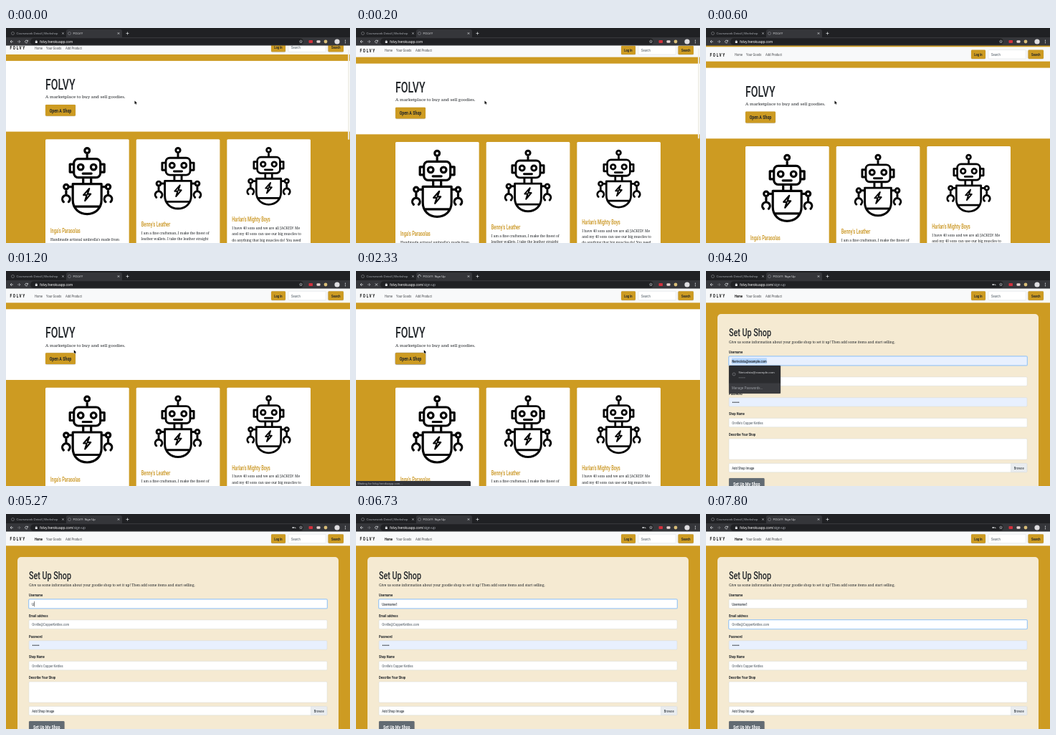
Animation of 480 by 300 pixels, one loop 8 s. Source, as an HTML page with a canvas:

```html
<!DOCTYPE html>
<html lang="en">
<head>
<meta charset="utf-8">
<title>Shop sign up</title>
<style>
html, body { margin: 0; width: 100%; height: 100%; overflow: hidden; background: #202124; }
canvas { display: block; width: 480px; height: 300px; }
</style>
</head>
<body>
<canvas id="stage"></canvas>
<script>
const W = 480, H = 300, LOOP = 8000;
const GOLD = '#cd9b22', INK = '#212529', GREY = '#6c757d', LINE = '#ced4da', FILLED = '#e8f0fe';
const SANS = '"Liberation Sans", Arial, sans-serif';
const DISPLAY = 'Roboto, "Liberation Sans", sans-serif';
const SERIF = '"Noto Serif", serif';
const NARROW = 0.7; // condensed look of the display face
const SHOP = 'FOLVY', HOST = 'folvy.herokuapp.com', MAIL = 'Nerivolsta@example.com';

const canvas = document.getElementById('stage');
const c = canvas.getContext('2d');
const dpr = window.devicePixelRatio || 1;
canvas.width = W * dpr;
canvas.height = H * dpr;

// ---------- helpers ----------
function track(t, keys) {
  if (t <= keys[0][0]) return keys[0][1];
  for (let i = 1; i < keys.length; i++) {
    const [t0, v0] = keys[i - 1], [t1, v1] = keys[i];
    if (t < t1) {
      const k = (t - t0) / (t1 - t0);
      return v0 + (v1 - v0) * k * k * (3 - 2 * k);
    }
  }
  return keys[keys.length - 1][1];
}

function rect(x, y, w, h, fill) {
  c.fillStyle = fill;
  c.fillRect(x, y, w, h);
}

function box(x, y, w, h, r, fill, stroke, line = 0.4) {
  c.beginPath();
  c.roundRect(x, y, w, h, r);
  if (fill) { c.fillStyle = fill; c.fill(); }
  if (stroke) { c.strokeStyle = stroke; c.lineWidth = line; c.stroke(); }
}

function disc(x, y, r, fill) {
  c.beginPath();
  c.arc(x, y, r, 0, 7);
  c.fillStyle = fill;
  c.fill();
}

function path(points, color, width) {
  c.beginPath();
  points.forEach(([x, y], i) => i ? c.lineTo(x, y) : c.moveTo(x, y));
  c.strokeStyle = color;
  c.lineWidth = width;
  c.stroke();
}

function text(s, x, y, size, color, face = SANS) {
  c.font = size + 'px ' + face;
  c.textAlign = 'left';
  c.fillStyle = color;
  c.fillText(s, x, y);
}

function display(s, x, y, size, color, align = 'left', weight = 500, gap = 0) {
  c.save();
  c.translate(x, y);
  c.scale(NARROW, 1);
  c.letterSpacing = gap + 'px';
  c.font = weight + ' ' + size + 'px ' + DISPLAY;
  c.textAlign = align;
  c.fillStyle = color;
  c.fillText(s, 0, 0);
  const width = c.measureText(s).width * NARROW;
  c.restore();
  return width;
}

function button(label, x, y, w, h, size, fill = GOLD, color = INK) {
  c.save();
  c.shadowColor = 'rgba(0,0,0,.3)';
  c.shadowBlur = 1.2 * dpr;
  c.shadowOffsetY = 0.3 * dpr;
  box(x, y, w, h, 1.4, fill);
  c.restore();
  display(label, x + w / 2, y + h / 2 + size * 0.36, size, color, 'center', 700);
}

// ---------- browser frame ----------
function globe(x, y) {
  c.beginPath();
  c.arc(x, y, 2, 0, 7);
  c.strokeStyle = '#8b8e93';
  c.lineWidth = 0.6;
  c.stroke();
}

function cross(x, y, r, color) {
  path([[x - r, y - r], [x + r, y + r]], color, 0.7);
  path([[x + r, y - r], [x - r, y + r]], color, 0.7);
}

function chrome(t, loading, signUp) {
  const light = '#e3e5e8', dim = '#a9adb3';
  rect(0, 0, W, 14, '#202124');
  box(84, 2, 78, 14, 2.5, '#35363a');
  rect(0, 13, W, 11.5, '#35363a');
  globe(9.5, 7.5);
  text('Coursework Detail | Workshop', 14.5, 9, 4.3, dim);
  cross(79.5, 7.5, 1.1, light);
  if (loading) {
    const a = t / 160;
    c.beginPath();
    c.arc(88.5, 7.5, 2, a, a + 4.4);
    c.strokeStyle = light;
    c.lineWidth = 0.7;
    c.stroke();
  } else globe(88.5, 7.5);
  text(loading || signUp ? SHOP + ': Sign Up' : SHOP, 93.5, 9, 4.3, light);
  cross(157, 7.5, 1.2, light);
  path([[167.5, 7.5], [171.5, 7.5]], light, 0.7);
  path([[169.5, 5.5], [169.5, 9.5]], light, 0.7);

  const arrow = (x, d, color) => {
    path([[x - 2 * d, 19], [x + 2 * d, 19]], color, 0.7);
    path([[x, 17], [x + 2 * d, 19], [x, 21]], color, 0.7);
  };
  arrow(8, -1, light);
  arrow(18, 1, signUp ? '#77797d' : dim);
  if (loading) cross(28.5, 19, 1.7, light);
  else {
    c.beginPath();
    c.arc(28.5, 19, 1.9, 0.5, 5.6);
    c.strokeStyle = light;
    c.lineWidth = 0.7;
    c.stroke();
    path([[30.5, 16.8], [30.5, 18.6], [28.8, 18.6]], light, 0.7);
  }
  box(34, 14.3, 381, 9.2, 4.6, '#202124');
  box(40.8, 18.3, 3, 2.6, 0.3, light);
  c.beginPath();
  c.arc(42.3, 18.2, 0.9, Math.PI, 0);
  c.strokeStyle = light;
  c.lineWidth = 0.5;
  c.stroke();
  text(HOST, 47.3, 20.7, 5, '#fff');
  if (loading || signUp) text('/sign-up', 47.3 + c.measureText(HOST).width, 20.7, 5, dim);
  if (signUp) {
    disc(400.5, 19, 1.1, light);
    path([[401, 19], [404, 19], [404, 20.2]], light, 0.7);
  }
  c.beginPath();
  for (let i = 0; i < 10; i++) {
    const r = i % 2 ? 1 : 2.2, a = i * Math.PI / 5 - Math.PI / 2;
    c.lineTo(411.5 + r * Math.cos(a), 19 + r * Math.sin(a));
  }
  c.closePath();
  c.strokeStyle = light;
  c.lineWidth = 0.5;
  c.stroke();
  box(422.5, 17, 5.5, 4, 0.8, '#d2303c');
  box(433.5, 17.3, 5, 3.4, 1, '#e6d5d3');
  disc(446, 19, 2.4, '#d8bd78');
  disc(462, 19, 3.6, '#dedde0');
  for (let i = -1; i < 2; i++) disc(473.5, 19 + i * 1.8, 0.6, light);
}

// ---------- pages ----------
function navbar(signUp) {
  rect(0, 24, W, 20.3, '#f8f9fa');
  display(SHOP, 5.5, 37.4, 6.8, '#111', 'left', 600, 2.4);
  const soft = '#6c6e71';
  display('Home', 40, 37, 5.9, signUp ? '#111' : soft, 'left', signUp ? 600 : 500);
  display('Your Goods', 56, 37, 5.9, soft);
  display('Add Product', 83, 37, 5.9, soft);
  button('Log In', 370, 28.3, 20, 12.4, 5.8);
  box(394, 28.3, 52.5, 12.4, 1.3, '#fff', LINE);
  display('Search', 398, 36.7, 5.9, GREY);
  button('Search', 449.5, 28.3, 21.5, 12.4, 5.8);
}

function robot(x, y, s) {
  c.save();
  c.translate(x, y);
  c.scale(s, s);
  c.strokeStyle = '#050505';
  c.lineWidth = 3.2;
  c.lineCap = c.lineJoin = 'round';
  c.beginPath();
  c.arc(0, 6, 3.4, 0, 7);
  c.moveTo(0, 10); c.lineTo(0, 17);
  c.roundRect(-18.5, 17.5, 37, 26, 6);
  c.moveTo(-5.5, 44); c.lineTo(-5.5, 52);
  c.moveTo(5.5, 44); c.lineTo(5.5, 52);
  c.moveTo(-6, 38); c.lineTo(6, 38);
  for (const d of [-1, 1]) {
    const arm = d * 29.3;
    c.moveTo(d * 9 + 3.8, 29); c.arc(d * 9, 29, 3.8, 0, 7);
    c.moveTo(d * 19, 25); c.lineTo(d * 24, 25);
    c.lineTo(d * 24, 36); c.lineTo(d * 19, 36);
    c.moveTo(d * 20, 56.5); c.lineTo(d * 25.5, 56.5);
    c.moveTo(arm + 3.2, 56.5); c.arc(arm, 56.5, 3.2, 0, 7);
    c.moveTo(arm, 60); c.lineTo(arm, 68);
    c.moveTo(arm - 3.6, 77.5); c.arc(arm, 73.5, 5.3, Math.PI * 0.73, Math.PI * 2.27);
  }
  c.moveTo(-20, 52.5); c.lineTo(20, 52.5); c.lineTo(20, 75);
  c.bezierCurveTo(20, 87, 11, 94.5, 0, 94.5);
  c.bezierCurveTo(-11, 94.5, -20, 87, -20, 75);
  c.closePath();
  c.moveTo(-17, 84); c.lineTo(17, 84);
  c.stroke();
  c.lineWidth = 2.2;
  c.beginPath();
  [[3, 59], [-5, 68], [-0.5, 68], [-3, 76], [5, 66.5], [0.5, 66.5]].forEach(p => c.lineTo(...p));
  c.closePath();
  c.stroke();
  c.restore();
}

const cards = [
  { x: 55, mid: 113.2, size: 1, head: 293.6, name: "Inga's Parasolas",
    lines: ["Handmade artisnal umbrella's made from"] },
  { x: 181.7, mid: 240, size: 0.92, head: 284.6, name: "Benny's Leather",
    lines: ['I am a fine craftsman, I make the finest of', 'leather wallets. I take the leather straight'] },
  { x: 308.3, mid: 366.5, size: 0.86, head: 277.6, name: "Harlan's Mighty Boys",
    lines: ['I have 40 sons and we are all JACKED! Me', 'and my 40 sons can use our big muscles to', 'do anything that big muscles do! You need'] }
];

function home(t) {
  const shift = track(t, [[60, -7.4], [340, 0], [480, 2.8], [600, 2.3], [1050, 0]]);
  c.save();
  c.translate(0, shift);
  navbar(false);
  rect(0, 53.3, W, 98.7, '#fff');
  display(SHOP, 55, 93.3, 20.2, INK);
  text('A marketplace to buy and sell goodies.', 55, 105.7, 6.12, INK, SERIF);
  if (t > 1800) box(54.4, 113.7, 43.2, 17, 2, 'rgba(140,120,80,.55)');
  button('Open A Shop', 55, 114.3, 42, 15.8, 7.5);
  for (const k of cards) {
    box(k.x, 162.7, 116.7, 160, 1.5, '#fff', 'rgba(0,0,0,.06)');
    robot(k.mid, 172.5, k.size);
    display(k.name, k.x + 7, k.head, 8.2, '#c8921a');
    k.lines.forEach((s, i) => text(s, k.x + 7, k.head + 10.8 + i * 8.3, 4.8, INK, SERIF));
  }
  c.restore();
  // Scrollbar thumb during the scroll
  if (t < 500) box(477, 27 - Math.min(0, shift) * 0.4, 2.2, 126, 1.1, 'rgba(240,238,232,.9)');
}

function field(label, y, h, fill, focus) {
  display(label, 32, y - 4, 6, INK, 'left', 600);
  if (focus > 0) {
    c.globalAlpha = focus;
    box(31, y - 1, 418, h + 2, 2.2, '#a9cbee');
    c.globalAlpha = 1;
  }
  box(32, y, 416, h, 1.3, fill, focus > 0.5 ? '#80bdff' : LINE);
}

// Moments at which each letter of the user name lands
const strokes = [5260, 5325, 5460, 5525, 5595, 5660, 5725, 5865, 6260];

function caret(x, y) {
  rect(x, y, 0.5, 7.6, '#111');
}

function form(t) {
  navbar(true);
  box(16, 60, 448, 260, 5, '#f5ead2');
  display('Set Up Shop', 32, 90.5, 15.4, INK);
  text('Give us some information about your goodie shop to set it up! Then add some items and start selling.',
    32, 101, 4.85, INK, SERIF);

  const typed = t >= strokes[0];
  const userFocus = track(t, [[3050, 0], [3200, 1], [7260, 1], [7460, 0]]);
  const mailFocus = track(t, [[7260, 0], [7460, 1]]);

  field('Username', 119.2, 12.4, typed ? '#fff' : FILLED, userFocus);
  if (typed) {
    const name = 'Username1'.slice(0, strokes.filter(s => s <= t).length);
    const width = display(name, 36.3, 127.6, 6, '#333a41');
    if (t < 6730 || (t >= 7000 && t < 7260)) caret(36.5 + width, 121.8);
  } else {
    if (t >= 3460) {
      c.font = '500 6px ' + DISPLAY;
      rect(36, 121.6, c.measureText(MAIL).width * NARROW + 0.5, 8, '#b3d4fc');
    }
    display(MAIL, 36.3, 127.6, 6, '#15181b');
  }

  field('Email address', 147.9, 12.4, '#fff', mailFocus);
  display('Orville@CopperKettles.com', 36.3, 156.3, 6, GREY);
  if (t >= 7260 && t < 7795) caret(36.2, 150.3);

  field('Password', 176.7, 12.4, FILLED, 0);
  for (let i = 0; i < 5; i++) disc(37.5 + i * 2, 183.2, 0.75, INK);

  field('Shop Name', 205.4, 12.4, '#fff', 0);
  display("Orville's Copper Kettles", 36.3, 213.8, 6, GREY);

  field('Describe Your Shop', 234.1, 29, '#fff', 0);

  box(32, 268.4, 416, 12.4, 1.3, '#fff', LINE);
  display('Add Shop Image', 36.3, 276.8, 6, '#3f464d');
  box(425.5, 268.6, 22.3, 12, [0, 1.2, 1.2, 0], '#e9ecef', LINE);
  display('Browse', 436.7, 276.8, 6, '#495057', 'center');
  button('Set Up My Shop', 32, 289, 49.5, 16, 7.5, '#626b73', '#fff');

  if (t >= 3050 && !typed) suggestions();
}

function suggestions() {
  c.save();
  c.shadowColor = 'rgba(0,0,0,.4)';
  c.shadowBlur = 2 * dpr;
  box(32, 132, 72, 38.8, 1.2, '#2b2c2f');
  c.restore();
  box(32, 156.5, 72, 14.3, [0, 0, 1.2, 1.2], '#3a3b3f');
  globe(39, 144);
  text(MAIL, 45.5, 142.6, 4.4, '#d6d8db');
  for (let i = 0; i < 5; i++) disc(46.3 + i * 1.9, 148.8, 0.6, '#85888d');
  text('Manage Passwords...', 36, 165.4, 4.5, '#9da1a6');
}

function pointer(t) {
  if (t >= 3460) return;
  const x = track(t, [[900, 179.5], [1190, 94.8], [2640, 94.8], [2870, 94]]);
  const y = track(t, [[900, 101.5], [1190, 110.2], [2640, 110.2], [2870, 125]]);
  if (t > 2800) {
    path([[x - 1, y - 3], [x, y - 2.6], [x + 1, y - 3]], '#222', 0.5);
    path([[x, y - 2.6], [x, y + 2.6]], '#222', 0.6);
    path([[x - 1, y + 3], [x, y + 2.6], [x + 1, y + 3]], '#222', 0.5);
    return;
  }
  c.beginPath();
  [[0, 0], [0, 4.6], [1.1, 3.7], [1.9, 5.3], [2.6, 5], [1.9, 3.4], [3.3, 3.3]]
    .forEach(([dx, dy]) => c.lineTo(x + dx, y + dy));
  c.closePath();
  c.strokeStyle = '#fff';
  c.lineWidth = 0.8;
  c.stroke();
  c.fillStyle = '#000';
  c.fill();
}

function draw(t) {
  const signUp = t >= 2590, loading = t >= 1860 && !signUp;
  c.setTransform(dpr, 0, 0, dpr, 0, 0);
  rect(0, 0, W, H, GOLD);
  if (signUp) form(t); else home(t);
  if (t >= 1930 && t < 2800) {
    box(-2, 293, 162, 9, 1.5, '#333438');
    text('Waiting for ' + HOST + '...', 2, 298, 4.2, '#b4b7bb');
  }
  chrome(t, loading, signUp);
  pointer(t);
}

const start = performance.now();
function tick() {
  draw((performance.now() - start) % LOOP);
  requestAnimationFrame(tick);
}
tick();
</script>
</body>
</html>
```
